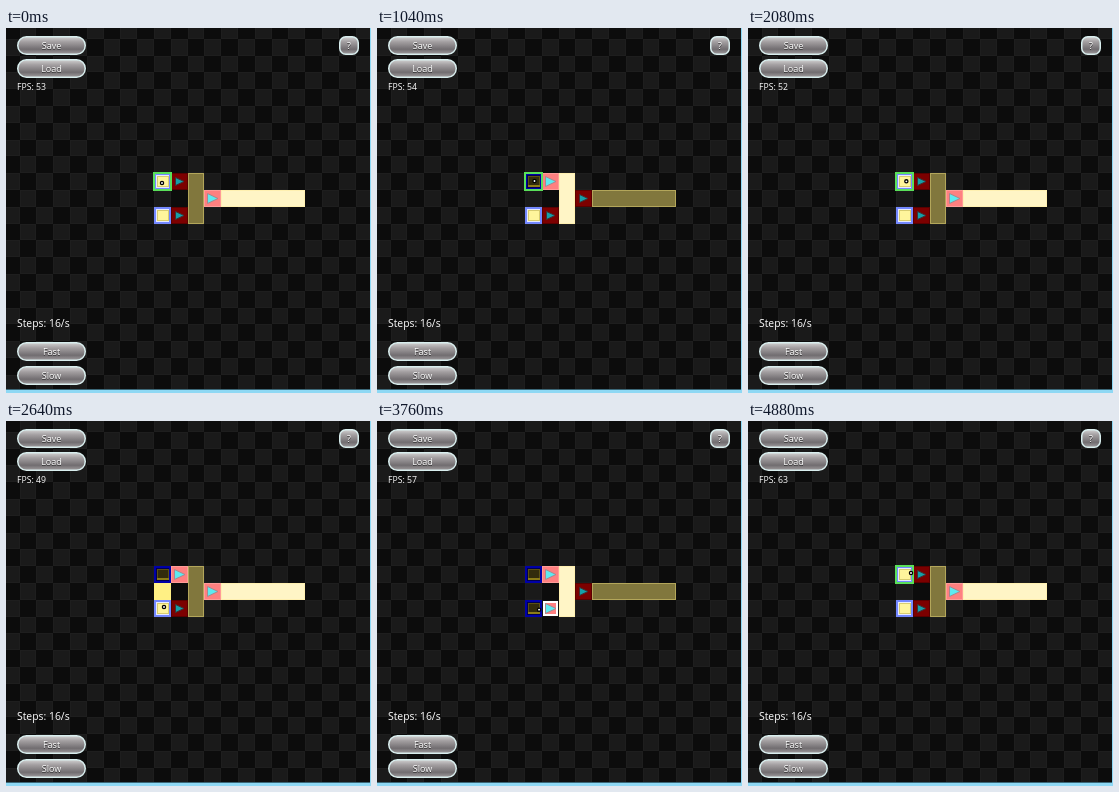
These frames come from a looping animation (365x365 px, 4960 ms). An HTML page with a canvas:

```html
<!DOCTYPE html>
<html>
<head>
<meta charset="utf-8">
<style>
html, body { margin: 0; width: 100%; height: 100%; overflow: hidden; background: #0c0c0c; }
canvas { display: block; }
</style>
</head>
<body>
<canvas id="stage" width="365" height="365"></canvas>
<script>
const ctx = document.getElementById('stage').getContext('2d');
const LOOP = 4960, TICK = 80, STEP = 62.5, CELL = 16.8;
const FPS = [53, 55, 54, 56, 52, 49, 54, 57, 55, 63];
// Pointer path: time, x, y
const PATH = [
  [0, 156, 155], [560, 155, 156], [1520, 160, 150], [2530, 157, 156],
  [2640, 158, 186], [3000, 158, 187], [3200, 194, 192], [3500, 195, 193],
  [3800, 157, 188], [4040, 157, 187], [4160, 162, 154], [4400, 160, 154], [4880, 163, 152]
];
const cellX = c => Math.round(148 + c * CELL);
const cellY = r => Math.round(145.2 + r * CELL);

// Circuit: each part reacts one simulation step after the part before it
const inputA = t => !((t >= 345 && t < 1650) || (t >= 2540 && t < 4420));
const inputB = t => !(t >= 2900 && t < 3860);
const notA = t => !inputA(t - STEP);
const notB = t => !inputB(t - STEP);
const join = t => notA(t - STEP) || notB(t - STEP);
const notJoin = t => !join(t - STEP);
const output = t => notJoin(t - STEP);

function pointer(t) {
  for (let i = 1; i < PATH.length; i++) {
    const [t0, x0, y0] = PATH[i - 1], [t1, x1, y1] = PATH[i];
    if (t <= t1) {
      const k = Math.max(0, (t - t0) / (t1 - t0));
      return [x0 + (x1 - x0) * k, y0 + (y1 - y0) * k];
    }
  }
  return PATH[PATH.length - 1].slice(1);
}

function rect(x, y, w, h, fill) {
  ctx.fillStyle = fill;
  ctx.fillRect(x, y, w, h);
}

function frame(x, y, w, h, color, width = 1) {
  ctx.strokeStyle = color;
  ctx.lineWidth = width;
  ctx.strokeRect(x + width / 2, y + width / 2, w - width, h - width);
}

function text(str, x, y, size, align = 'left') {
  ctx.font = `${size}px "Open Sans", sans-serif`;
  ctx.textAlign = align;
  ctx.fillStyle = '#fff';
  ctx.fillText(str, x, y);
}

function background() {
  rect(0, 0, 365, 365, '#0c0c0c');
  for (let r = -9; r < 14; r++) {
    for (let c = -9; c < 14; c++) {
      if ((r + c) % 2 === 0) continue;
      const x = cellX(c), y = cellY(r), w = cellX(c + 1) - x, h = cellY(r + 1) - y;
      rect(x, y, w, h, '#1a1a1a');
      frame(x, y, w, h, '#1e1e1e');
    }
  }
  rect(0, 361, 365, 1, '#3c6878');
  rect(0, 362, 365, 3, '#8ed8f4');
  rect(364, 0, 1, 365, '#8ed8f4');
}

function button(label, x, y, w, h, radius) {
  const shade = ctx.createLinearGradient(0, y, 0, y + h);
  shade.addColorStop(0, '#d8d8d8');
  shade.addColorStop(0.3, '#a4a0a2');
  shade.addColorStop(0.7, '#716d70');
  shade.addColorStop(1, '#a8a4a6');
  ctx.beginPath();
  ctx.roundRect(x + 0.75, y + 0.75, w - 1.5, h - 1.5, radius);
  ctx.fillStyle = shade;
  ctx.fill();
  ctx.strokeStyle = '#d9eeee';
  ctx.lineWidth = 1.5;
  ctx.stroke();
  ctx.shadowColor = '#333';
  ctx.shadowOffsetY = 1;
  text(label, x + w / 2, y + h / 2 + 3.2, 9, 'center');
  ctx.shadowColor = 'transparent';
}

function wire(c, r, cols, rows, on) {
  const x = cellX(c), y = cellY(r), w = cellX(c + cols) - x, h = cellY(r + rows) - y;
  rect(x, y, w, h, on ? '#fff5c6' : '#81773d');
  frame(x, y, w, h, on ? '#fff0b0' : '#b3a65a');
}

function inverter(c, r, on) {
  const x = cellX(c), y = cellY(r), s = on ? 5 : 4;
  rect(x, y, 17, 17, on ? '#ff8080' : '#7c0000');
  frame(x, y, 17, 17, on ? '#ff9c98' : '#5a0000');
  ctx.beginPath();
  ctx.moveTo(x + 8.5 - s, y + 8.5 - s);
  ctx.lineTo(x + 9 + s, y + 8.5);
  ctx.lineTo(x + 8.5 - s, y + 8.5 + s);
  ctx.closePath();
  ctx.fillStyle = on ? '#5eeaf0' : '#16a0a8';
  ctx.fill();
  ctx.strokeStyle = on ? '#a58a90' : '#3c3438';
  ctx.lineWidth = 1;
  ctx.stroke();
}

function input(r, on) {
  const x = cellX(0), y = cellY(r);
  rect(x, y, 17, 17, on ? '#7488ff' : '#0000a8');
  rect(x + 2, y + 2, 13, 13, on ? '#e8ecff' : '#000050');
  rect(x + 3, y + 3, 12, 11, on ? '#fff59c' : '#332c0c');
  frame(x + 3, y + 3, 12, 11, on ? '#d8cc70' : '#5c5012');
  if (!on) rect(x + 3, y + 12, 12, 2, '#8c7c18');
}

function hover([px, py]) {
  const c = Math.floor((px - 148) / CELL), r = Math.floor((py - 145.2) / CELL);
  const x = cellX(c), y = cellY(r);
  if (r === 1 && c < 2) {
    rect(x, y, 17, 17, '#fff084');
  } else if (c === 0) {
    frame(x - 1, y - 1, 19, 19, '#5ae05a', 2);
  } else {
    frame(x, y, 17, 17, '#111');
    frame(x + 1, y + 1, 15, 15, '#fff', 2);
  }
}

function cursor([x, y]) {
  ctx.beginPath();
  ctx.arc(x, y, 1.6, 0, 7);
  ctx.fillStyle = '#fff';
  ctx.fill();
  ctx.strokeStyle = '#000';
  ctx.lineWidth = 1.3;
  ctx.stroke();
}

function draw(now) {
  const t = Math.floor((now % LOOP) / TICK) * TICK;
  background();
  wire(2, 0, 1, 3, join(t));
  wire(4, 1, 5, 1, output(t));
  input(0, inputA(t));
  input(2, inputB(t));
  inverter(1, 0, notA(t));
  inverter(1, 2, notB(t));
  inverter(3, 1, notJoin(t));
  hover(pointer(t - TICK)); // highlight trails the pointer by one tick
  cursor(pointer(t));

  button('Save', 11, 8, 69, 19, 9);
  button('Load', 11, 31, 69, 19, 9);
  button('Fast', 11, 314, 69, 19, 9);
  button('Slow', 11, 338, 69, 19, 9);
  button('?', 333, 8, 20, 19, 6);
  text('FPS: ' + FPS[Math.floor(t / 500)], 11, 61.5, 8.7);
  text('Steps: 16/s', 11, 299, 10.4);
  requestAnimationFrame(draw);
}
requestAnimationFrame(draw);
</script>
</body>
</html>
```
